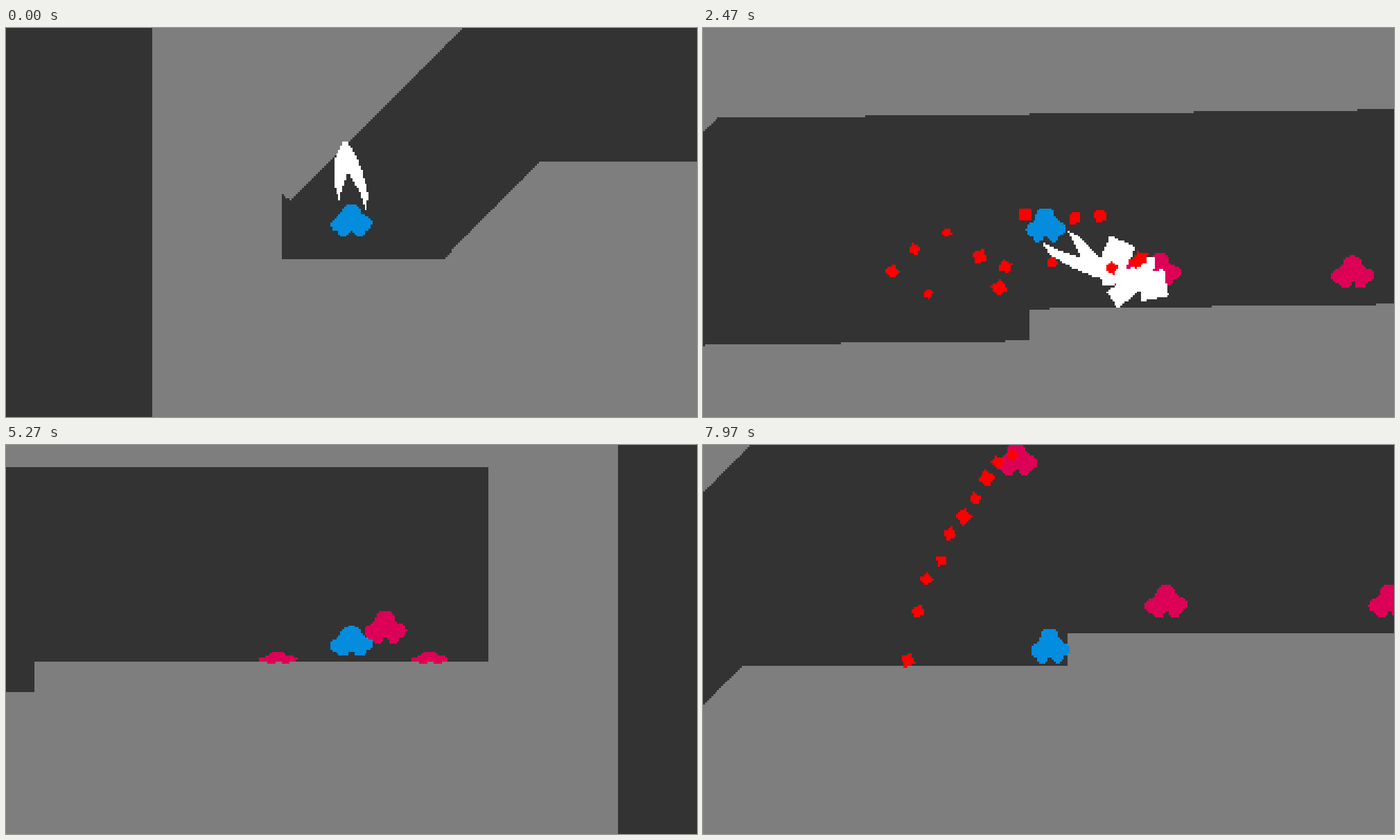
An HTML page with a canvas for the animation above (8000 ms loop, 997 by 562 pixels).

```html
<!DOCTYPE html>
<html lang="en">
<head>
<meta charset="utf-8">
<title>Cave brawl</title>
<style>
html, body { margin: 0; width: 100%; height: 100%; overflow: hidden; background: #333; }
canvas { display: block; width: 997px; height: 562px; image-rendering: pixelated; }
</style>
</head>
<body>
<canvas id="stage" width="341" height="192"></canvas>
<script>
const ctx = document.getElementById('stage').getContext('2d');
const W = 341, H = 192, PIXEL = 997 / W, LOOP = 8000, RESPAWN = 6380;
const MID = [498, 281];
const DARK = '#333333', ROCK = '#7e7e7e', BLUE = '#048cde', PINK = '#dc0056', RED = '#ff0000', WHITE = '#ffffff';

// Level, in world units
const ROOM = [[398, 240], [410, 248], [792, -134], [1893, -134], [1893, 147], [1239, 147],
  [1239, 193], [770, 193], [632, 333], [398, 333]];
const box = (x0, y0, x1, y1) => [[x0, y0], [x1, y0], [x1, y1], [x0, y1]];
const floorAt = x => x < 632 ? 333 : x < 770 ? 965 - x : x < 1239 ? 193 : 147;

// time, x, y
const CAMERA = [[0, 0, 0], [220, 0, 24], [560, 0, 28], [830, 102, 28], [1300, 300, -90],
  [1633, 435, -115], [2100, 620, -141], [2467, 770, -258], [2700, 850, -285], [3367, 1074, -295],
  [3700, 1150, -275], [4170, 1194, -254], [4433, 1198, -251], [5000, 1198, -210], [5400, 1197, -153],
  [5800, 1197, -157], [6379, 1197, -157], [6380, 90, 24], [6700, 212, -45], [7000, 330, -112],
  [7480, 525, -166], [7967, 714, -126], [8000, 718, -124]];

// Screen shake: time, angle
const TILTS = [[1633, .0105], [2467, -.0124], [4433, .0095]];

// time, screen x, screen y, width (height follows)
const HERO = [[0, 498, 277, .98], [220, 497, 284, 1.12], [400, 498, 281, .9], [1100, 498, 278, .84],
  [1400, 499, 280, .95], [1633, 498, 277, .8], [2050, 497, 283, 1], [2467, 494, 284, .93],
  [3367, 508, 272, 1.15], [4433, 497, 281, .9], [5400, 498, 283, 1.06], [5700, 498, 281, .89],
  [6800, 498, 278, .86], [7967, 500, 290, .93]];

// time, world x, world y
const FOES = [
  [[0, 1048, 147], [1640, 1048, 147], [2040, 1204, -112], [2430, 1372, 98], [2500, 1388, 98],
    [2750, 1470, -100], [3250, 1584, 142], [6379, 1590, 142], [6380, 1048, 147], [7670, 1048, 147],
    [7967, 1166, -106]],
  [[0, 1384, 99], [2420, 1384, 99], [2467, 1428, 92], [2750, 1550, -100], [3250, 1783, 142],
    [4380, 1783, 142], [4433, 1807, 142], [6379, 1809, 142], [6380, 1382, 99]],
  [[0, 1706, 99], [4360, 1706, 99], [4433, 1718, 113], [4700, 1800, -30], [5300, 1740, 99],
    [5600, 1690, 99], [5900, 1410, 0], [6379, 900, 140], [6380, 1704, 99]]];

// start, angle in degrees, offset from the hero
const SLASHES = [[-100, -90, 0, 0], [1622, -32, 2, 28], [2370, 46, 0, 0], [4333, 171, 62, 32],
  [5570, 180, 0, 0], [7640, -120, 0, 0]];
const SLASH = [[113, -12], [113, -5], [98, 4], [70, 16], [35, 25], [15, 21], [40, 12], [69, -4],
  [45, -13], [27, -17], [50, -24], [88, -24]];

// Puffs: peak time, screen x, screen y, reach x, reach y, count, mean side
const BURSTS = [[1633, 600, 275, 52, 66, 10, 23], [2467, 611, 358, 42, 38, 6, 32],
  [4433, 492, 360, 84, 92, 14, 22], [5650, 450, 270, 50, 60, 10, 23], [7690, 450, 280, 50, 60, 8, 23]];

// Blood: start, end, first drop, last drop (screen at the end time), rise, scatter, count
const TRAILS = [[1680, 2467, 270, 340, 645, 300, 10, 60, 14], [2540, 3367, 325, 434, 610, 365, -18, 16, 7],
  [5640, 6267, 348, 253, 14, 210, 42, 16, 10], [7690, 7967, 293, 306, 442, 20, 50, 20, 10]];

const clamp = (v, lo, hi) => Math.max(lo, Math.min(hi, v));
const noise = n => { const s = Math.sin(n * 127.1) * 43758.5; return s - Math.floor(s); };

// Smooth interpolation that never overshoots its keys
function track(keys, t) {
  const i = keys.findIndex(k => k[0] > t) - 1;
  if (i < 0) return keys[keys.length - 1].slice(1);
  const a = keys[i], b = keys[i + 1], span = b[0] - a[0], u = (t - a[0]) / span;
  const slope = (j, c) => j < 0 || j > keys.length - 2 ? 0
    : (keys[j + 1][c] - keys[j][c]) / (keys[j + 1][0] - keys[j][0]);
  const tangent = (j, c) => {
    const p = slope(j - 1, c), q = slope(j, c);
    return p * q > 0 ? 2 * p * q / (p + q) : 0;
  };
  return a.slice(1).map((v, n) => {
    const c = n + 1, w = 1 - u;
    return v * w * w * (1 + 2 * u) + b[c] * u * u * (3 - 2 * u)
      + span * u * w * (w * tangent(i, c) - u * tangent(i + 1, c));
  });
}

// Hard-edged polygon fill on the coarse pixel grid
function fill(points, color) {
  ctx.fillStyle = color;
  const pts = points.map(([x, y]) => [x / PIXEL, y / PIXEL]);
  const ys = pts.map(p => p[1]);
  const top = Math.max(0, Math.floor(Math.min(...ys)));
  const end = Math.min(H, Math.ceil(Math.max(...ys)));
  for (let row = top; row < end; row++) {
    const y = row + .5, cuts = [];
    pts.forEach(([x0, y0], i) => {
      const [x1, y1] = pts[(i + 1) % pts.length];
      if ((y0 <= y) !== (y1 <= y)) cuts.push(x0 + (y - y0) / (y1 - y0) * (x1 - x0));
    });
    cuts.sort((a, b) => a - b);
    for (let i = 0; i + 1 < cuts.length; i += 2) {
      const left = Math.round(cuts[i]), right = Math.round(cuts[i + 1]);
      if (right > left) ctx.fillRect(left, row, right - left, 1);
    }
  }
}

const place = (points, x, y, turn, sx = 1, sy = 1) => {
  const c = Math.cos(turn), s = Math.sin(turn);
  return points.map(([px, py]) => [x + px * sx * c - py * sy * s, y + px * sx * s + py * sy * c]);
};
const disc = (x, y, r) => Array.from({ length: 14 }, (_, i) =>
  [x + r * Math.cos(i * Math.PI / 7), y + r * Math.sin(i * Math.PI / 7)]);
const square = (x, y, side, turn) => place(box(-side / 2, -side / 2, side / 2, side / 2), x, y, turn);

const BODY = [disc(0, -9, 15), disc(-20, 7, 10), disc(21, 5, 10), disc(-11, 15, 9), disc(12, 15, 9),
  [[-14, -10], [14, -10], [27, 0], [14, 15], [-14, 15], [-27, 2]]];
const drawBody = (color, x, y, sx, sy, turn) =>
  BODY.forEach(part => fill(place(part, x, y, turn, sx, sy), color));

function render(t) {
  const [camX, camY] = track(CAMERA, t);
  const tilt = TILTS.reduce((sum, [at, angle]) => sum + angle * clamp(1 - Math.abs(t - at) / 170, 0, 1), 0);
  const view = points => place(points.map(([x, y]) => [x - camX - MID[0], y - camY - MID[1]]), ...MID, tilt);
  const sameLife = at => (at < RESPAWN) === (t < RESPAWN);

  ctx.fillStyle = ROCK;
  ctx.fillRect(0, 0, W, H);
  [ROOM, box(-900, -2000, 210, 2000), box(2080, -2000, 3500, 2000)].forEach(p => fill(view(p), DARK));

  FOES.forEach(keys => {
    const [x, y] = track(keys, t), [[sx, sy]] = view([[x, y]]);
    const flat = x > 1239 ? clamp((y - 120) / 22, 0, 1) : 0;
    drawBody(PINK, sx, sy, 1 - .1 * flat, 1 - .64 * flat, 0);
  });

  BURSTS.forEach(([at, x, y, reachX, reachY, count, side]) => {
    const age = t - at;
    if (age < -80 || age > 250 || !sameLife(at)) return;
    const [cx, cy] = track(CAMERA, at);
    const spread = 1 + age / (age < 0 ? 160 : 600), size = clamp(1 - age / 250, 0, 1);
    for (let i = 0; i < count; i++) {
      const a = i * 2.4 + 1, r = spread * Math.sqrt((i + .5) / count);
      const [[px, py]] = view([[x + cx + reachX * r * Math.cos(a), y + cy + reachY * r * Math.sin(a)]]);
      fill(square(px, py, side * size * (.7 + .6 * noise(i + at)), noise(i * 5 + at) * 1.6 + age / 400), WHITE);
    }
  });

  TRAILS.forEach(([from, at, x0, y0, x1, y1, rise, scatter, count]) => {
    if (t < from || t > at + 600 || !sameLife(at)) return;
    const [cx, cy] = track(CAMERA, at), d = t - at;
    for (let i = 0; i < count && t >= from + (at - from) * i / count; i++) {
      const u = i / (count - 1), side = 11 + 7 * noise(i * 7 + at);
      const x = x0 + (x1 - x0) * u + cx + (noise(i + at) - .5) * (.08 * d + scatter / 2);
      const y = y0 + (y1 - y0) * u - 4 * rise * u * (1 - u) + (noise(i * 2 + at) - .5) * 2 * scatter + cy;
      const [[px, py]] = view([[x, Math.min(y + .1 * d, floorAt(x) - side / 2)]]);
      fill(square(px, py, side * clamp(1 - d / 600, 0, 1), noise(i * 3 + at) * 1.6 + d / 300), RED);
    }
  });

  const [x, y, width] = track(HERO, t);
  drawBody(BLUE, x, y, width, .98 / width, .75 * clamp(1.2 - Math.abs(t - 4433) / 250, 0, 1));

  SLASHES.forEach(([start, angle, ox, oy]) => {
    const age = t - start;
    if (age < 0 || age > 190) return;
    const breadth = Math.min(1, age / 90, (190 - age) / 70);
    const length = Math.min(1, .5 + age / 130);
    fill(place(SLASH, x + ox, y + oy, angle * Math.PI / 180, length, breadth), WHITE);
  });
}

const start = performance.now();
function tick() {
  const t = (performance.now() - start) % LOOP;
  render(Math.floor((t + 4) * .03) / .03);
  requestAnimationFrame(tick);
}
tick();
</script>
</body>
</html>
```
